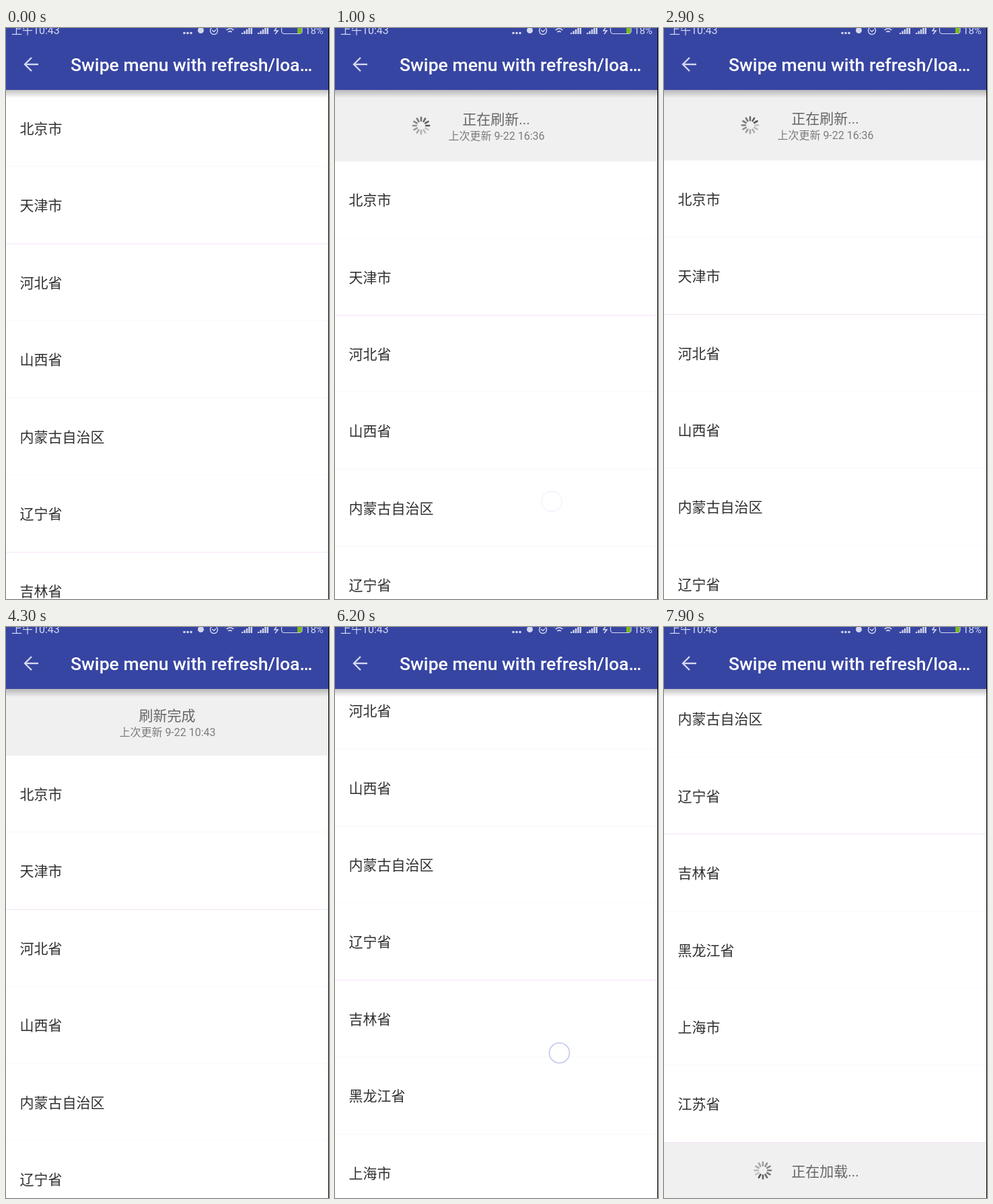
An HTML page with a canvas that plays this animation: 480x848 px, repeating every 8 s.

```html
<!DOCTYPE html>
<html lang="zh-CN">
<head>
<meta charset="utf-8">
<style>
html, body { margin: 0; width: 480px; height: 848px; overflow: hidden; background: #fff; }
canvas { display: block; }
</style>
</head>
<body>
<canvas id="stage" width="480" height="848"></canvas>
<script>
const ctx = document.getElementById('stage').getContext('2d');
const LOOP = 8000, STEP = 100;
const W = 480, H = 848, TOP = 92, ROW = 114.43, SWIPED = 2;
const FONT = 'Roboto, "Noto Sans CJK SC", "Noto Sans CJK", sans-serif';
const PANEL = '#f1f0f1', ICON = '#d3d8f0';
const places = ['北京市', '天津市', '河北省', '山西省', '内蒙古自治区',
  '辽宁省', '吉林省', '黑龙江省', '上海市', '江苏省'];

// Piecewise smooth track through [time, value] points.
function track(t, points) {
  if (t <= points[0][0]) return points[0][1];
  for (let i = 1; i < points.length; i++) {
    const [t0, a] = points[i - 1], [t1, b] = points[i];
    if (t < t1) {
      const x = (t - t0) / (t1 - t0);
      return a + (b - a) * x * x * (3 - 2 * x);
    }
  }
  return points[points.length - 1][1];
}

function rect(x, y, w, h, color) {
  ctx.fillStyle = color;
  ctx.fillRect(x, y, w, h);
}

function text(str, x, y, size, color, align = 'left', weight = 400) {
  ctx.font = `${weight} ${size}px ${FONT}`;
  ctx.textAlign = align;
  ctx.fillStyle = color;
  ctx.fillText(str, x, y);
}

function line(points, color, width) {
  ctx.beginPath();
  points.forEach(([x, y]) => ctx.lineTo(x, y));
  ctx.strokeStyle = color;
  ctx.lineWidth = width;
  ctx.stroke();
}

function arc(x, y, r, from, to, color, width) {
  ctx.beginPath();
  ctx.arc(x, y, r, from, to);
  ctx.strokeStyle = color;
  ctx.lineWidth = width;
  ctx.stroke();
}

function dot(x, y, r, color) {
  ctx.beginPath();
  ctx.arc(x, y, r, 0, 7);
  ctx.fillStyle = color;
  ctx.fill();
}

function spinner(x, y, degrees) {
  ctx.save();
  ctx.translate(x, y);
  ctx.rotate(Math.round(degrees / 30) * Math.PI / 6);
  ctx.lineCap = 'round';
  for (let i = 0; i < 12; i++) {
    line([[0, -7.2], [0, -12.2]], `rgba(85,85,85,${1 - i * 0.065})`, 2.6);
    ctx.rotate(-Math.PI / 6);
  }
  ctx.restore();
}

function pullArrow(x, y, up) {
  ctx.save();
  ctx.translate(x, y);
  if (up) ctx.rotate(Math.PI);
  line([[0, -12], [0, 11]], '#666', 2.4);
  line([[-8, 4], [0, 12], [8, 4]], '#666', 2.4);
  ctx.restore();
}

function refreshHeader(t, pull) {
  if (pull <= 0) return;
  const mid = TOP + pull / 2, done = t >= 4000, busy = t >= 750 && !done;
  const ready = pull > 105;
  rect(0, TOP, W, pull, PANEL);
  if (busy) spinner(128, mid, 100 + (Math.min(t, 3800) - 1000) * 0.36);
  else if (!done) pullArrow(128, mid, ready);
  const label = done ? '刷新完成' : busy ? '正在刷新...' : ready ? '释放立即刷新' : '下拉可以刷新';
  text(label, 239.5, mid - 2.5, 21, '#666', 'center');
  text(`上次更新 9-22 ${done ? '10:43' : '16:36'}`, 240, mid + 21, 16, '#7c7c7c', 'center');
}

function loadFooter(t, y) {
  if (y >= H) return;
  const mid = (y + H) / 2, busy = t >= 6500;
  rect(0, y, W, H - y, PANEL);
  if (busy) spinner(147, mid, 165 + (t - 6800) * 0.36);
  else pullArrow(147, mid, true);
  text(busy ? '正在加载...' : '上拉加载更多', 239.5, mid + 9, 21, '#666', 'center');
}

function list(t, shift, swipe) {
  places.forEach((name, i) => {
    const y = TOP + i * ROW + shift, base = y + 65;
    const moved = i === SWIPED ? swipe : 0;
    if (moved > 0) {
      rect(W - moved, Math.round(y), 141, 114, '#ffd024');
      text('Delete', W - moved + 70, base, 21.3, '#333', 'center');
    }
    text(name, 20.5 - moved, base, 21, '#303030');
    rect(0, Math.floor(y + ROW - 0.5), W, 1, i % 4 === 1 ? '#f6e3f6' : '#fbf8fb');
  });
}

function statusBar() {
  text('上午10:43', 8, 9, 16, ICON);
  [265, 270, 275].forEach(x => dot(x, 7.5, 1.8, ICON));
  dot(289.5, 3.5, 4.5, ICON);
  arc(309, 4, 5.5, 0, 7, ICON, 1.4);
  line([[306, 3], [309, 5.5], [312, 2.5]], ICON, 1.3);
  [4, 8, 12].forEach(r => arc(333, 9, r, -2.3, -0.84, ICON, 1.7));
  [350, 374].forEach(x => {
    for (let i = 0; i < 5; i++) rect(x + i * 3.4, 7 - i * 2.5, 2.4, 2 + i * 2.5, ICON);
  });
  line([[403, -2], [399, 4], [404, 4], [400, 9]], ICON, 1.6);
  ctx.beginPath();
  ctx.roundRect(409.5, -5, 30.5, 13.5, 4);
  ctx.strokeStyle = ICON;
  ctx.lineWidth = 1.2;
  ctx.stroke();
  rect(433, -4, 6, 12, '#79bd18');
  text('18%', 444, 9, 15, ICON);
}

function appBar() {
  const shadow = ctx.createLinearGradient(0, TOP, 0, TOP + 12);
  shadow.addColorStop(0, 'rgba(0,0,0,.24)');
  shadow.addColorStop(1, 'rgba(0,0,0,0)');
  rect(0, TOP, W, 12, shadow);
  rect(0, 0, W, TOP, '#3745a2');
  statusBar();
  line([[48, 54], [28, 54]], ICON, 2.4);
  line([[38, 44], [28, 54], [38, 64]], ICON, 2.4);
  text('Swipe menu with refresh/loa…', 96, 64, 26.6, '#fff', 'left', 500);
}

// A finger drag that fades out after it is lifted.
function touch(t, start, end, from, to) {
  const alpha = track(t, [[end, 1], [end + 350, 0]]);
  if (t < start || alpha <= 0) return;
  const [x, y] = [0, 1].map(k => track(t, [[start, from[k]], [end, to[k]]]));
  ctx.globalAlpha = alpha;
  dot(x, y, 15, 'rgba(255,255,255,.6)');
  arc(x, y, 15, 0, 7, '#c6cdf0', 1.8);
  ctx.globalAlpha = 1;
}

function draw(t) {
  const pull = track(t, [[50, 0], [700, 165], [1030, 104.7], [4250, 104.7], [4600, 0]]);
  const swipe = track(t, [[4600, 0], [5050, 141], [5400, 141], [5700, 0]]);
  const scroll = track(t, [[5700, 0], [6700, 507.5], [6950, 507.5], [7300, 470.5]]);
  const shift = pull - scroll;

  rect(0, 0, W, H, '#fff');
  list(t, shift, swipe);
  refreshHeader(t, pull);
  loadFooter(t, Math.round(TOP + places.length * ROW + shift));
  touch(t, 100, 750, [300, 380], [322, 703]);
  touch(t, 4600, 5100, [405, 385], [250, 430.5]);
  touch(t, 5700, 6900, [325, 800], [347.5, 355]);
  appBar();
  rect(W - 1, 0, 1, H, '#000');
}

const begin = performance.now();
function tick() {
  const t = (performance.now() - begin) % LOOP;
  draw(Math.floor(t / STEP) * STEP);
  requestAnimationFrame(tick);
}
tick();
</script>
</body>
</html>
```
